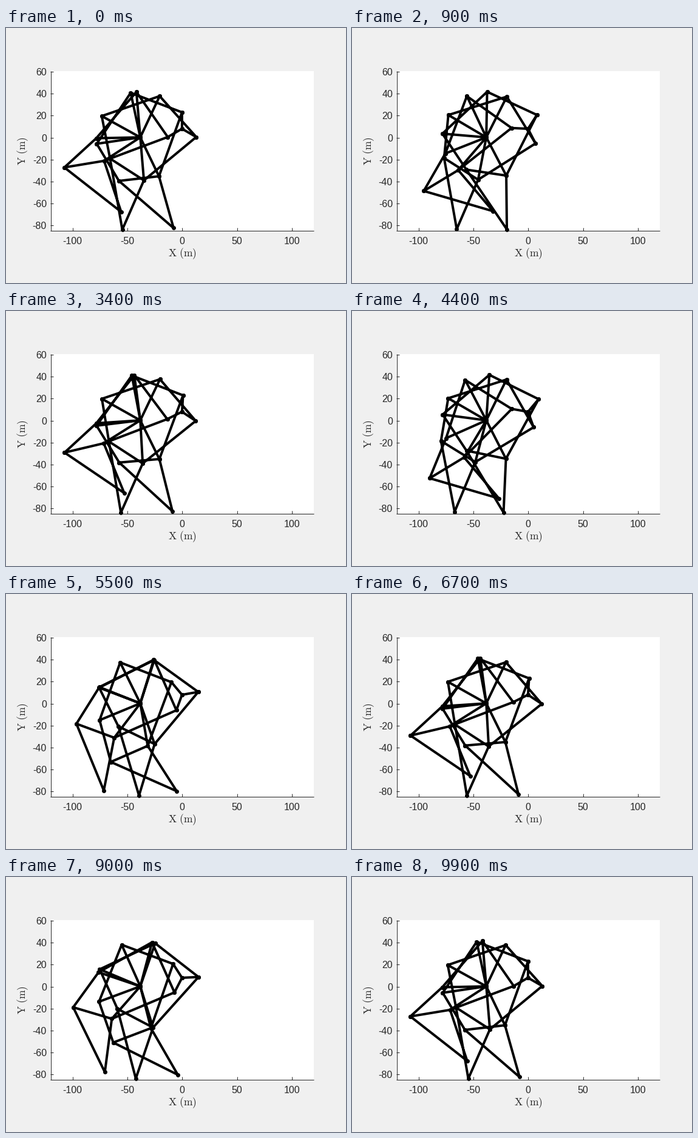
A matplotlib script for the animation above (10000 ms loop, 560 by 420 pixels).

```python
import numpy as np
import matplotlib.pyplot as plt
from matplotlib.animation import FuncAnimation

FRAMES = 100
LEGS = 3
W, H, DPI = 560, 420, 80
PX = 72 / DPI  # points per pixel
INK = "#262626"

# Plot box in pixels, equal scale on both axes
LEFT, RIGHT, TOP, BOTTOM = 73, 507, 71, 334
SCALE = 434 / 240
X0, Y0 = 289.9, 180.1

plt.rcParams["mathtext.fontset"] = "cm"
fig = plt.figure(figsize=(W / DPI, H / DPI), dpi=DPI, facecolor="#f0f0f0")
ax = fig.add_axes([0, 0, 1, 1])
ax.set(xlim=(0, W), ylim=(H, 0))
ax.axis("off")


def px(x):
    return X0 + SCALE * x


def py(y):
    return Y0 - SCALE * y


def rule(x, y):
    ax.plot(x, y, color=INK, lw=PX, solid_capstyle="butt", zorder=2)


def label(x, y, s, size, **kw):
    ax.text(x, y, s, fontsize=size * PX, color=INK, family="Liberation Sans", **kw)


def draw_axes():
    ax.add_patch(plt.Rectangle((LEFT, TOP), RIGHT - LEFT, BOTTOM - TOP,
                               fc="white", ec="none", zorder=1))
    base, side = BOTTOM - 0.5, LEFT + 0.5
    rule([LEFT, RIGHT], [base, base])
    rule([side, side], [TOP, BOTTOM])
    for v in range(-100, 101, 50):
        x = np.floor(px(v)) + 0.5
        rule([x, x], [BOTTOM - 5, BOTTOM])
        label(px(v), 356.5, str(v), 16, ha="center", va="baseline")
    for v in range(-80, 61, 20):
        y = np.floor(py(v)) + 0.5
        rule([LEFT, LEFT + 5], [y, y])
        label(67, py(v) + 6.5, str(v), 16, ha="right", va="baseline")
    label(290, 372, r"$\mathrm{X\ (m)}$", 17.6, ha="center", va="center")
    label(28, 202.5, r"$\mathrm{Y\ (m)}$", 17.6, ha="center", va="center", rotation=90)


def joint(p, q, rp, rq):
    """Point at distances rp, rq from p, q, to the left of p -> q."""
    d = abs(q - p)
    a = (rp**2 - rq**2 + d**2) / (2 * d)
    return p + (q - p) / d * (a + 1j * np.sqrt(rp**2 - a**2))


def leg(angle):
    """Bars of one Jansen leg as complex points, broken by nan."""
    hub, pivot = 7.8j, -38 + 0j
    crank = hub + 15 * np.exp(1j * angle)
    top = joint(pivot, crank, 41.5, 50)
    back = joint(pivot, top, 40.1, 55.8)
    low = joint(crank, pivot, 61.9, 39.3)
    knee = joint(low, back, 36.7, 39.4)
    foot = joint(low, knee, 49, 65.7)
    return [hub, crank, top, back, knee, foot, low, crank, np.nan,
            top, pivot, back, np.nan, pivot, low, knee, np.nan]


draw_axes()
bars, = ax.plot([], [], color="black", lw=4 * PX, solid_joinstyle="round",
                solid_capstyle="round", zorder=3)
dots, = ax.plot([], [], "o", color="black", ms=7 * PX, mew=0, zorder=4)


def update(i):
    turn = np.pi / 2 - 2 * np.pi * i / (FRAMES - 1)
    pts = np.concatenate([leg(turn + 2 * np.pi * k / LEGS) for k in range(LEGS)])
    for line in (bars, dots):
        line.set_data(px(pts.real), py(pts.imag))
    return bars, dots


anim = FuncAnimation(fig, update, frames=FRAMES, interval=100,
                     repeat=True, repeat_delay=0, blit=False)
plt.show()
```
